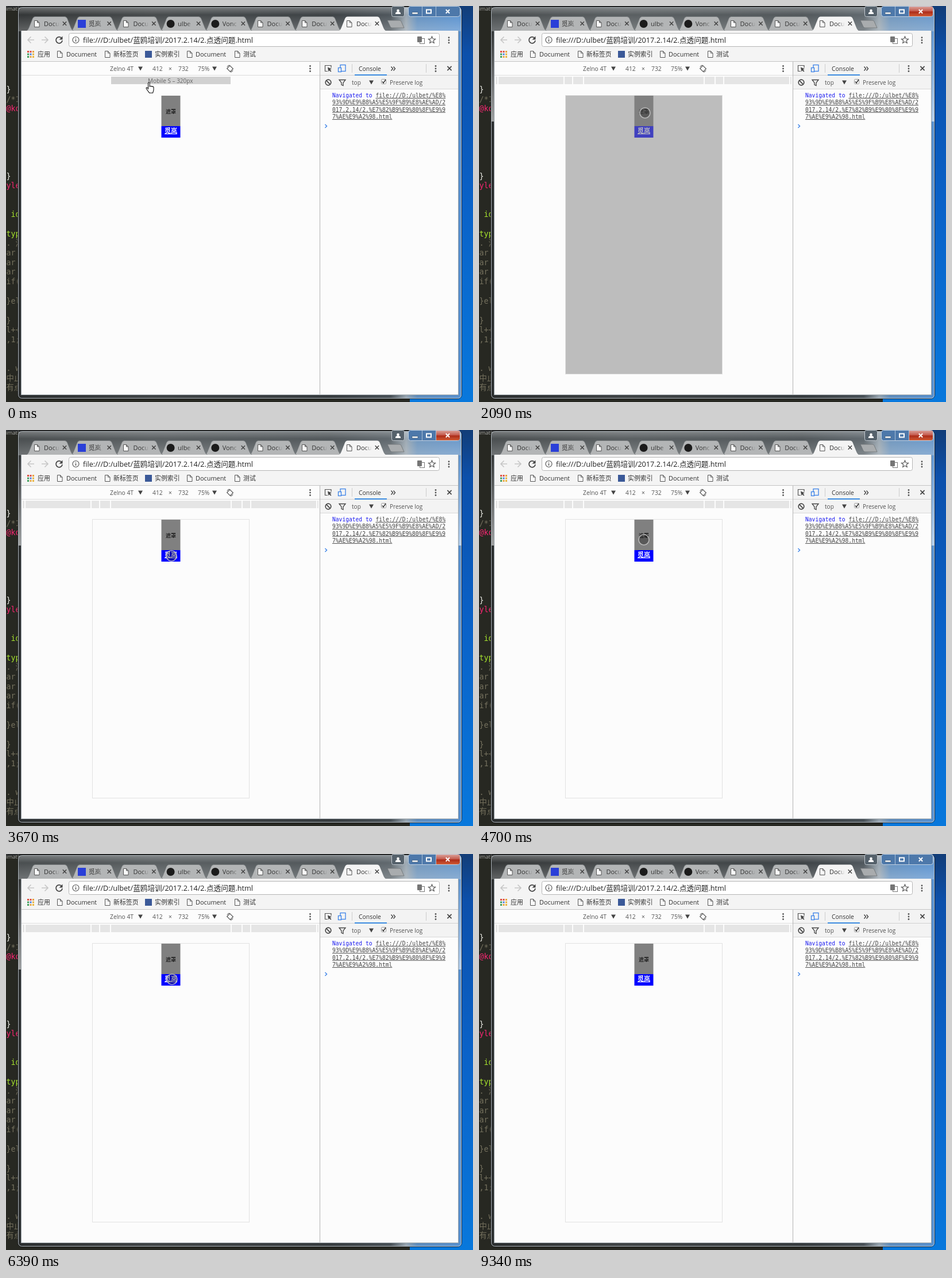
Animation, 813 px wide and 689 px high, one loop 9440 ms. Source, as an HTML page:

```html
<!DOCTYPE html>
<html lang="zh">
<head>
<meta charset="utf-8">
<title>Tap-through demo</title>
<style>
html, body { margin: 0; width: 100%; height: 100%; overflow: hidden; background: #272822; }
svg { display: block; width: 813px; height: 689px; }
text { font-family: "Open Sans", "Noto Sans CJK SC", "Noto Sans CJK", sans-serif; white-space: pre; }
.mono { font-family: "DejaVu Sans Mono", "Noto Sans CJK SC", "Noto Sans CJK", monospace; }
</style>
</head>
<body>
<svg id="stage" viewBox="0 0 813 689" xmlns="http://www.w3.org/2000/svg">
  <defs>
    <linearGradient id="desk" x1="0" y1="0" x2="0" y2="1">
      <stop offset="0" stop-color="#123d78"/><stop offset=".12" stop-color="#0c50ab"/>
      <stop offset=".5" stop-color="#0a62c8"/><stop offset="1" stop-color="#0878dc"/>
    </linearGradient>
    <linearGradient id="glass" gradientUnits="userSpaceOnUse" x1="22" y1="0" x2="793" y2="0">
      <stop offset="0" stop-color="#2b2e2f"/><stop offset=".3" stop-color="#404446"/>
      <stop offset=".7" stop-color="#363b3e"/><stop offset=".84" stop-color="#485056"/>
      <stop offset=".875" stop-color="#98a5b0"/><stop offset=".9" stop-color="#5f8dbd"/>
      <stop offset="1" stop-color="#5790cf"/>
    </linearGradient>
    <linearGradient id="shine" x1="0" y1="0" x2="0" y2="1">
      <stop offset="0" stop-color="#fff" stop-opacity=".3"/><stop offset=".3" stop-color="#fff" stop-opacity=".04"/>
      <stop offset="1" stop-color="#fff" stop-opacity=".26"/>
    </linearGradient>
    <linearGradient id="side" x1="0" y1="0" x2="0" y2="1">
      <stop offset="0" stop-color="#fff" stop-opacity=".05"/><stop offset="1" stop-color="#fff" stop-opacity=".55"/>
    </linearGradient>
    <linearGradient id="red" x1="0" y1="0" x2="0" y2="1">
      <stop offset="0" stop-color="#d9a199"/><stop offset=".48" stop-color="#c4574a"/>
      <stop offset=".52" stop-color="#ab2a18"/><stop offset="1" stop-color="#cf5a35"/>
    </linearGradient>
    <linearGradient id="fadeOff"><stop stop-color="#b3b5b6" stop-opacity="0"/><stop offset="1" stop-color="#b3b5b6"/></linearGradient>
    <linearGradient id="fadeOn"><stop stop-color="#f4f4f4" stop-opacity="0"/><stop offset="1" stop-color="#f4f4f4"/></linearGradient>
  </defs>
</svg>
<script>
const NS = "http://www.w3.org/2000/svg";
const stage = document.getElementById("stage");
let layer = stage;

function add(tag, attrs, body) {
  const el = document.createElementNS(NS, tag);
  for (const k in attrs) el.setAttribute(k, attrs[k]);
  if (body !== undefined) el.textContent = body;
  return layer.appendChild(el);
}
const rect = (x, y, width, height, fill, more) => add("rect", { x, y, width, height, fill, ...more });
const text = (x, y, size, str, fill = "#333", more) =>
  add("text", { x, y, "font-size": size, fill, ...more }, str);
const line = (d, stroke, width = 1, more) =>
  add("path", { d, stroke, "stroke-width": width, fill: "none", ...more });
const shape = (d, fill, more) => add("path", { d, fill, ...more });
const dot = (cx, cy, r, fill, more) => add("circle", { cx, cy, r, fill, ...more });
const cross = (x, y, r, color, w) =>
  line(`M${x - r} ${y - r}l${2 * r} ${2 * r}m0 ${-2 * r}l${-2 * r} ${2 * r}`, color, w);
const arrowDown = (x, y) => shape(`M${x - 4} ${y - 3.5}h8l-4 7z`, "#444");
const dots = (x, y) => [-4.5, 0, 4.5].forEach(d => dot(x, y + d, 1.4, "#555"));
const page = (x, y) =>
  line(`M${x + .5} ${y + .5}h5l3.5 3.5v7.5h-8.5zM${x + 5.5} ${y + .5}v3.5h3.5`, "#555", 1, { fill: "#fafafa" });

function group(draw) {
  const outer = layer;
  const g = layer = add("g", {});
  draw();
  layer = outer;
  return g;
}
const show = (el, on) => el.setAttribute("display", on ? "inline" : "none");

// Desktop and editor behind the browser
rect(0, 0, 813, 689, "#272822");
rect(703, 0, 110, 689, "url(#desk)");
rect(0, 0, 703, 3, "#2a2c2d");
text(0, 8, 9.5, "imatio", "#aaa");
const PINK = "#f92672", GREEN = "#a6e22e", GREY = "#75715e", PALE = "#e8e8e2";
[
  [150, "}", PALE], [167, "/*1", GREY], [183, "@ko", PINK], [301, "}", PALE], [317, "yle", PINK],
  [367, " id", GREEN], [401, "type", GREEN], [417, ". 渲", GREY], [434, "ar ", GREY],
  [451, "ar ", GREY], [467, "ar ", GREY], [484, "if(", GREY], [518, "}el", GREY], [552, "}", GREY],
  [568, "l++", GREY], [585, ",1;", GREY], [635, ". w", GREY], [652, "中止", GREY], [668, "有点", GREY]
].forEach(([y, s, c]) => text(0.5, y, 13.3, s, c, { class: "mono" }));

// Window frame
rect(20.5, 1.5, 773, 682, "none", { rx: 7, stroke: "#111", "stroke-opacity": .7 });
rect(21, 2, 772, 681, "url(#glass)", { rx: 6 });
rect(22, 3, 770, 41, "url(#shine)");
rect(21.5, 2.5, 771, 680, "none", { rx: 6, stroke: "#c8d0d6", "stroke-opacity": .85 });
const focusGlow = group(() => {
  rect(22, 3, 770, 41, "#a4adb4", { opacity: .2 });
  rect(22, 44, 5, 157, "url(#side)");
  rect(788, 44, 5, 157, "url(#side)");
});

// Window buttons
rect(671.5, .5, 22, 18, "#55616b", { rx: 3, stroke: "#c3cad0" });
dot(682.5, 8, 2.3, "#fff");
shape("M678 14v-2q1-2 4.500-2t4.500 2v2z", "#fff");
rect(700.5, .5, 90, 18, "#4d78aa", { rx: 4, stroke: "#c3d2e2" });
const closeRed = shape("M749 1h41v13q0 4-4 4h-37z", "url(#red)");
line("M724.500 1v17M748.500 1v17", "#a9bfd6");
rect(707, 11, 10, 3, "#fff", { stroke: "#345", "stroke-width": .5 });
rect(732, 6.5, 8, 6, "none", { stroke: "#fff", "stroke-width": 2 });
cross(769, 9.5, 3.2, "#fff", 2);

// Tabs
const tabs = ["Docu", "觅岚", "Docu", "ulbe", "Vonc", "Docu", "Docu", "Docu"];
function tab(i) {
  const x = 35 + 77.7 * i, on = i === 7, fill = on ? "#f4f4f4" : "#b3b5b6";
  shape(`M${x} 43.500q3-1 5-6l6-15q1.500-4 5-4h51q3.500 0 5 4l6 15q2 5 5 6z`, fill,
    { stroke: on ? "none" : "#6d7174", "stroke-width": .8 });
  if (i === 1) rect(125, 24, 14, 14, "#2a3fd8");
  else if (i === 3 || i === 4) dot(x + 18.500, 31, 7, "#1b1b1b");
  else page(Math.round(x + 14), 25);
  text(x + 31, 35, 11, tabs[i], "#333");
  rect(x + 46, 22, 12, 18, `url(#${on ? "fadeOn" : "fadeOff"})`);
  cross(x + 67, 30.500, 3.2, "#444", 1.5);
}
for (let i = 6; i >= 0; i--) tab(i);
shape("M664 25h21q2 0 3 2l5 11h-21q-2 0-3-2z", "#a9acae", { stroke: "#6d7174", "stroke-width": .8 });
rect(26.5, 43.5, 761, 633, "#fcfcfc", { stroke: "#9aa2a8" });
rect(27, 43, 760, 54, "#f4f4f4");
tab(7);

// Address bar
line("M49 59h-11m5.500-5.500l-5.500 5.500l5.500 5.500M62 59h11m-5.500-5.500l5.500 5.500l-5.500 5.500", "#c6c6c6", 1.6);
line("M96.500 55.500a5.500 5.500 0 1 0 1.500 4.500", "#444", 1.8);
shape("M98.500 52.500v6h-6z", "#444");
rect(109.5, 47.5, 645, 23, "#fff", { rx: 3, stroke: "#b5b5b5" });
dot(121.5, 59, 5.5, "none", { stroke: "#555", "stroke-width": 1.2 });
line("M121.500 58v4M121.500 55.500v1.300", "#555", 1.4);
text(134, 63.5, 12.65, "file:///D:/ulbet/蓝鸥培训/2017.2.14/2.点透问题.html", "#222");
rect(720.5, 56.5, 8, 9, "#fff", { stroke: "#777" });
rect(716, 53, 8, 10, "#757575", { rx: 1 });
shape("M741.500 53l1.700 4l4.300.400l-3.300 2.800l1 4.200l-3.700-2.300l-3.700 2.300l1-4.200l-3.300-2.800l4.300-.400z", "none",
  { stroke: "#555", "stroke-width": 1.2 });
dots(771, 59.5);

// Bookmarks
["#e04a3f", "#e04a3f", "#e8a33d", "#3c9d58", "#4a80e0", "#e8b53d", "#3c9d58", "#e8a33d", "#e8b53d"]
  .forEach((c, i) => rect(37 + i % 3 * 4.500, 78 + Math.floor(i / 3) * 4.500, 3, 3, c));
[89, 172, 315, 398].forEach(x => page(x, 78));
rect(242, 78, 12, 12, "#3b5998");
[[55, "应用"], [105, "Document"], [187, "新标签页"], [259, "实例索引"], [330, "Document"], [413, "测试"]]
  .forEach(([x, s]) => text(x, 88, 10.9, s));

// Device toolbar
rect(27, 96, 760, 1, "#c4c4c4");
rect(27, 120, 519, 1, "#dcdcdc");
[[181, "Zelno 4T"], [255, "412"], [283, "×"], [300, "732"], [334, "75%"]]
  .forEach(([x, s]) => text(x, 113, 10.3, s, "#555"));
arrowDown(234, 109);
arrowDown(363, 109);
rect(386.5, 105, 7, 8, "none", { stroke: "#555", "stroke-width": 1.2, transform: "rotate(-45 390 109)" });
line("M385 106q1-3 4-3M395 112q-1 3-4 3", "#555");
dots(529.5, 109);

// Developer tools
rect(547, 97, 240, 47, "#f3f3f3");
rect(547, 120, 240, 1, "#d0d0d0");
rect(547, 144, 240, 1, "#d8d8d8");
rect(546, 97, 1, 580, "#b4b4b4");
line("M560 113.500h-4.500v-10h10.500v4", "#555", 1.2);
shape("M560 106.500l7 3l-3 1.200l2.500 2.500l-1.300 1.300l-2.500-2.500l-1.300 2.500z", "#444");
rect(582, 102.5, 9, 11, "none", { stroke: "#3b82e8", "stroke-width": 1.3 });
rect(578.5, 107.5, 5, 7, "#f3f3f3", { stroke: "#3b82e8", "stroke-width": 1.3 });
line("M602.500 101v15M731.500 101v15", "#ccc");
text(614, 113, 10.4, "Console", "#333");
rect(607, 119, 56, 2, "#3b8be0");
line("M670.500 105.500l3 3.500l-3 3.500M674.500 105.500l3 3.500l-3 3.500", "#444", 1.4);
dots(748, 109);
cross(772, 108.5, 3.6, "#444", 1.7);
dot(561, 133, 4.8, "none", { stroke: "#444", "stroke-width": 1.7 });
line("M557.700 129.700l6.600 6.600", "#444", 1.7);
line("M580 128.500h11l-4 5v5l-3-1.500v-3.500z", "#444", 1.3);
text(602, 137, 10.1, "top", "#555");
arrowDown(636, 133);
rect(653.5, 127.5, 8, 8, "#fff", { rx: 1, stroke: "#999" });
line("M655 131.500l2 2.500l4-6", "#333", 1.5);
text(668, 137, 10, "Preserve log", "#555");
const mono = { class: "mono" }, link = { class: "mono", "text-decoration": "underline" };
text(568, 159, 9.65, "Navigated to ", "#1c1cf0", mono);
text(643.5, 159, 9.65, "file:///D:/ulbet/%E8%", "#444", link);
["93%9D%E9%B8%A5%E5%9F%B9%E8%AE%AD/2", "017.2.14/2.%E7%82%B9%E9%80%8F%E9%9", "7%AE%E9%A2%98.html"]
  .forEach((s, i) => text(568, 171.3 + 12.3 * i, 9.65, s, "#444", link));
line("M555.500 206l3 3l-3 3", "#3b82e8", 1.4);

// Ruler states
const hoverRuler = group(() => {
  rect(183, 123, 208, 13, "#d1d1d1");
  text(247, 134, 10, "Mobile S – 320px", "#666");
});
const partRuler = group(() => {
  rect(183, 123, 208, 13, "#e5e5e5");
  rect(183, 149, 208, 7, "#f7f7f7");
  rect(183, 155, 208, 1, "#e8e8e8");
});
const fullRuler = group(() => {
  const ends = [28, 33, 148, 163, 182, 392, 411, 426, 541, 545];
  ends.slice(1).forEach((x, i) => rect(ends[i] + 1, 123, x - ends[i] - 2, 13, "#e5e5e5"));
  rect(150.5, 155.5, 273, 485, "none", { stroke: "#e2e2e2" });
});

// Emulated page
rect(270.5, 156, 33, 53, "#808080");
text(278, 187, 9, "遮罩", "#000");
rect(270.5, 209, 33, 20, "#00f");
text(276, 221, 11, "觅岚", "#fff", { "text-decoration": "underline", "font-weight": 700 });
const mask = rect(151, 156, 272, 484, "#808080", { opacity: .5 });

// Pointers
const pointers = {
  hand: group(() => shape("M4.500 12V2q1.300-2 2.600 0v6q1.300-1.400 2.500 0q1.300-1 2.400.400q1.400-.800 2 .800v5l-1.400 5h-6l-4.600-6.200q-1.800-3 0-3.200q1.500.600 2.500 2.200z",
    "#fff", { stroke: "#111", "stroke-width": 1.1 })),
  arrow: group(() => shape("M.500.500v15l3.500-3.300l2.300 5.300l2.300-1l-2.300-5.200h4.700z", "#fff", { stroke: "#111" })),
  ring: group(() => dot(0, 0, 9, "#000", { "fill-opacity": .3, stroke: "#c4c4c4", "stroke-opacity": .85, "stroke-width": 1.6 }))
};
const ringDot = pointers.ring.firstChild;

const LOOP = 9440;
const path = [
  [0, "hand", 243, 132], [840, "hand", 261, 135], [990, "arrow", 280, 146],
  [1110, "ring", 294, 166], [1230, "ring", 294, 177], [1380, "ring", 293, 185],
  [1660, "ring", 291, 186], [2090, "ring", 289, 186], [2960, "ring", 291, 200],
  [3080, "ring", 293, 214], [3360, "ring", 288, 219], [4700, "ring", 287, 191],
  [5840, "ring", 290, 211], [5990, "ring", 290, 216], [6110, "ring", 289, 218],
  [6540, "ring", 305, 222], [6660, "ring", 322, 226], [6780, "ring", 333, 227],
  [7180, "ring", 330, 215], [7300, "ring", 327, 205], [7450, "ring", 310, 193],
  [7570, "ring", 289, 181.5], [7840, "ring", 291, 181.5], [8120, "ring", 395, 282],
  [8240, "arrow", 515, 390], [8390, "arrow", 651, 617], [8540, "arrow", 694, 642],
  [8660, "arrow", 737, 666], [8780, "none", 0, 0]
];
const presses = [[1970, 2090], [3360, 3670], [5230, 5690], [6110, 6390]];
const masked = [[1970, 3670], [5230, 6390]];
const within = (t, spans) => spans.some(([a, b]) => t >= a && t < b);

function draw(t) {
  const [, kind, x, y] = path.filter(s => s[0] <= t).pop();
  for (const k in pointers) show(pointers[k], k === kind);
  if (pointers[kind]) pointers[kind].setAttribute("transform", `translate(${x} ${y})`);
  ringDot.setAttribute("fill-opacity", within(t, presses) ? .6 : .3);
  const active = t >= 1970 && t < 9340;
  show(focusGlow, active);
  show(closeRed, active);
  show(hoverRuler, t < 990);
  show(partRuler, t >= 990 && t < 1970);
  show(fullRuler, t >= 1970);
  show(mask, within(t, masked));
}

const start = performance.now();
function tick() {
  draw((performance.now() - start) % LOOP);
  requestAnimationFrame(tick);
}
tick();
</script>
</body>
</html>
```
